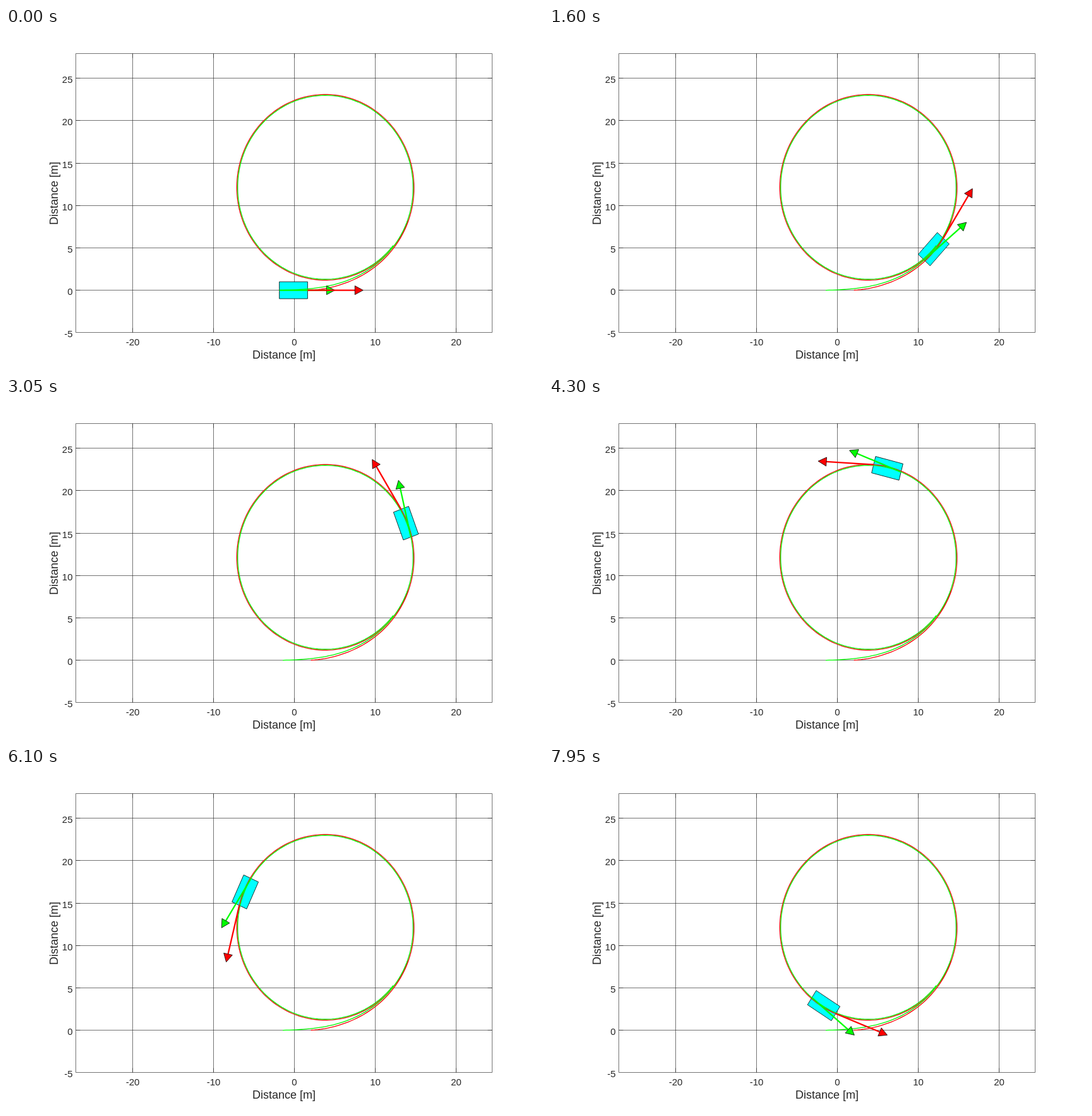
An HTML page that plays this animation: 850 px wide and 542 px high, repeating every 8000 ms.

```html
<!DOCTYPE html>
<html lang="en">
<head>
<meta charset="utf-8">
<title>Vehicle path</title>
<style>
  html, body { margin: 0; width: 100%; height: 100%; overflow: hidden; background: #fff; }
  svg { display: block; width: 850px; height: 542px; }
  text { font-family: "Liberation Sans", Arial, sans-serif; fill: #262626; }
  .tick { font-size: 15px; }
  .label { font-size: 18px; text-anchor: middle; }
  .grid { stroke: #262626; stroke-opacity: .8; stroke-width: .8; fill: none; }
  .path { fill: none; stroke-width: 1.3; stroke-linejoin: round; }
  .shaft { stroke-width: 2.3; }
  .outlined { stroke: #000; stroke-width: .8; }
</style>
</head>
<body>
<svg id="stage" viewBox="0 0 850 542"></svg>
<script>
const LOOP = 8000, STEP = 50;
const RED = '#f00', GREEN = '#0f0';
const FRAME = { left: 110.5, right: 769.5, top: 40.5, bottom: 482.5 };

// Vehicle model, in metres, seconds and radians
const RAD = Math.PI / 180;
const LENGTH = 3.5, HALF_WIDTH = 1, ARROW = 6.87;
const YAW_RATE = 44.33 * RAD, SPEED = YAW_RATE * 10.95;
const YAW_LAG = 0.563, FRONT_LAG = 0.22;
const FRONT_SLIP = 10.9 * RAD, REAR_SLIP = -7.5 * RAD;

const stage = document.getElementById('stage');
const px = ([x, y]) => [456.4 + x * 12.79, 415.6 - y * 13.435];
const rise = (t, lag) => 1 - Math.exp(-t / lag);
const move = ([x, y], angle, d) => [x + d * Math.cos(angle), y + d * Math.sin(angle)];
const points = list => list.map(p => p.map(v => v.toFixed(2)).join()).join(' ');

function add(tag, attrs, text) {
  const el = document.createElementNS('http://www.w3.org/2000/svg', tag);
  for (const key in attrs) el.setAttribute(key, attrs[key]);
  if (text) el.textContent = text;
  return stage.appendChild(el);
}

function angles(t) {
  const heading = YAW_RATE * (t - YAW_LAG * rise(t, YAW_LAG));
  return {
    heading,
    front: heading + FRONT_SLIP * rise(t, FRONT_LAG),
    rear: heading + REAR_SLIP * rise(t, YAW_LAG)
  };
}

// Ten seconds of poses, one per 50 ms
function drive() {
  const poses = [], sub = 20, dt = STEP / 1000 / sub;
  let front = [1.64, 0];
  for (let i = 0; i <= 200; i++) {
    const dir = angles(i * STEP / 1000);
    poses.push({ dir, front, rear: move(front, dir.heading, -LENGTH) });
    for (let k = 0; k < sub; k++) {
      front = move(front, angles((i * sub + k + 0.5) * dt).front, SPEED * dt);
    }
  }
  return poses;
}

function drawAxes() {
  const { left, right, top, bottom } = FRAME;
  const line = d => add('path', { class: 'grid', d });
  for (let x = -20; x <= 20; x += 10) {
    const gx = Math.floor(px([x, 0])[0]) + 0.5;
    line(`M${gx} ${top}V${bottom}`);
    line(`M${gx} ${top}v7M${gx} ${bottom}v-7`);
    add('text', { class: 'tick', x: gx, y: 503, 'text-anchor': 'middle' }, String(x));
  }
  for (let y = -5; y <= 25; y += 5) {
    const gy = Math.floor(px([0, y])[1]) + 0.5;
    if (y > -5) {
      line(`M${left} ${gy}H${right}`);
      line(`M${left} ${gy}h7M${right} ${gy}h-7`);
    }
    add('text', { class: 'tick', x: 105.5, y: gy + 7, 'text-anchor': 'end' }, String(y));
  }
  line(`M${left} ${top}H${right}V${bottom}H${left}Z`);
  add('text', { class: 'label', x: 440, y: 524 }, 'Distance [m]');
  add('text', { class: 'label', transform: 'translate(82 262) rotate(-90)' }, 'Distance [m]');
}

function makeArrow(color) {
  const shaft = add('line', { class: 'shaft', stroke: color });
  const head = add('polygon', { class: 'outlined', fill: color });
  return (from, angle) => {
    const [x1, y1] = px(from), tip = px(move(from, angle, ARROW));
    const a = Math.atan2(tip[1] - y1, tip[0] - x1);
    const base = move(tip, a, -13);
    const side = d => move(base, a + Math.PI / 2, d);
    const ends = { x1, y1, x2: base[0], y2: base[1] };
    for (const key in ends) shaft.setAttribute(key, ends[key]);
    head.setAttribute('points', points([tip, side(7), side(-7)]));
  };
}

const poses = drive();
drawAxes();
const body = add('polygon', { class: 'outlined', fill: '#0ff' });
for (const [end, color] of [['front', RED], ['rear', GREEN]]) {
  add('polyline', { class: 'path', stroke: color, points: points(poses.slice(1).map(p => px(p[end]))) });
}
const rearArrow = makeArrow(GREEN);
const frontArrow = makeArrow(RED);

function render(ms) {
  const { dir, front, rear } = poses[Math.floor(ms % LOOP / STEP)];
  const side = (p, d) => px(move(p, dir.heading + Math.PI / 2, d));
  body.setAttribute('points', points([
    side(front, HALF_WIDTH), side(front, -HALF_WIDTH),
    side(rear, -HALF_WIDTH), side(rear, HALF_WIDTH)
  ]));
  rearArrow(rear, dir.rear);
  frontArrow(front, dir.front);
}

const start = performance.now();
function tick() {
  render(performance.now() - start);
  requestAnimationFrame(tick);
}
tick();
</script>
</body>
</html>
```
